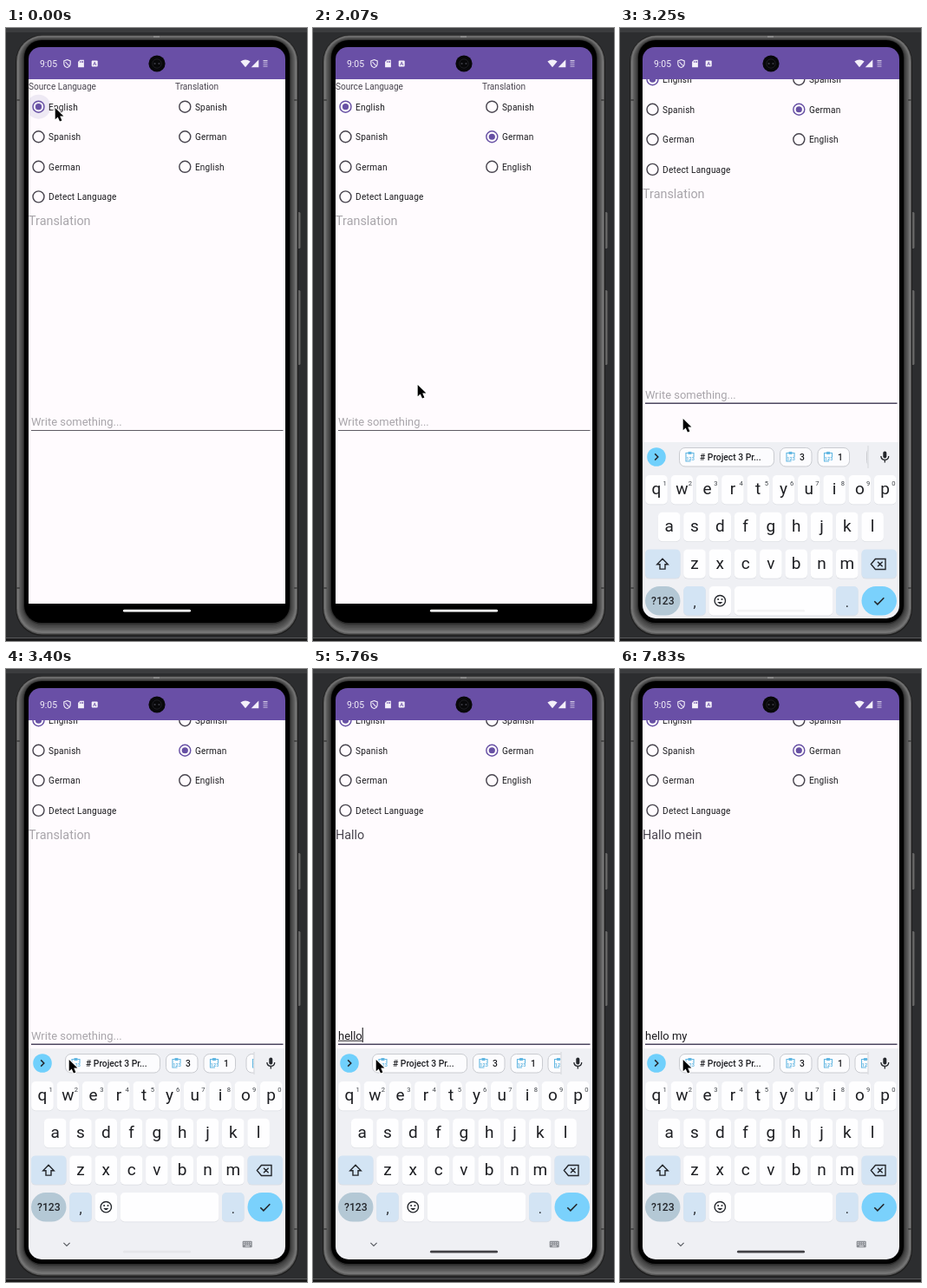
An HTML page with a canvas that plays this animation: 347 px wide and 706 px high, repeating every 8000 ms.

```html
<!DOCTYPE html>
<html lang="en">
<head>
<meta charset="utf-8">
<title>Translator app</title>
<style>
html, body { margin: 0; width: 100%; height: 100%; overflow: hidden; background: #2c2d2f; }
canvas { display: block; }
</style>
</head>
<body>
<canvas id="stage" width="347" height="706"></canvas>
<script>
const ctx = document.getElementById('stage').getContext('2d');
const LOOP = 8000, TICK = 147.7, LEAD = 8;
const PURPLE = '#6750a4', INK = '#1c1b1f', GREY = '#49454f', HINT = '#a8a5aa';
const SCROLL = 31.5;

// Pointer path: [tick, x, y]
const PATH = [
  [0, 56, 91], [1, 88, 107], [2, 145, 148], [3, 225, 186], [4, 296, 200],
  [5, 290, 172], [6, 236, 132], [7, 215, 123], [11, 215, 123], [12, 200, 170],
  [13, 160, 290], [14, 120, 410], [15, 95, 473], [16, 86, 470], [17, 81, 461], [18, 72, 449]
];
// Typed text by tick
const TYPED = [[0, ''], [35, 'h'], [36, 'hel'], [37, 'hello'], [40, 'hello '],
  [44, 'hello m'], [46, 'hello my'], [48, 'hello my ']];
const OUTPUT = [[0, ''], [39, 'Hallo'], [47, 'Hallo mein']];
const CARET = [[20, 22], [26, 28], [33, 53]];
const PILL = [[0, .06], [28, .25], [29, .5], [31, .92], [33, 1]];

const last = (list, k) => list.filter(e => e[0] <= k).pop()[1];
const within = (k, a, b) => k >= a && k < b;

function box(x, y, w, h, r, fill, stroke, width = 1) {
  ctx.beginPath();
  ctx.roundRect(x, y, w, h, r);
  if (fill) { ctx.fillStyle = fill; ctx.fill(); }
  if (stroke) { ctx.strokeStyle = stroke; ctx.lineWidth = width; ctx.stroke(); }
}

function disc(x, y, r, fill, stroke, width) {
  ctx.beginPath();
  ctx.arc(x, y, r, 0, 7);
  if (fill) { ctx.fillStyle = fill; ctx.fill(); }
  if (stroke) { ctx.strokeStyle = stroke; ctx.lineWidth = width; ctx.stroke(); }
}

function shape(d, x, y, fill, stroke, width = 1.2) {
  const p = new Path2D(d);
  ctx.save();
  ctx.translate(x, y);
  if (fill) { ctx.fillStyle = fill; ctx.fill(p); }
  if (stroke) { ctx.strokeStyle = stroke; ctx.lineWidth = width; ctx.stroke(p); }
  ctx.restore();
}

function text(s, x, y, size, color, { weight = 400, align = 'left', gap = 0 } = {}) {
  ctx.font = `${weight} ${size}px Roboto, sans-serif`;
  ctx.letterSpacing = gap + 'px';
  ctx.textAlign = align;
  ctx.fillStyle = color;
  ctx.fillText(s, x, y);
}

function clipped(x, y, w, h, r, draw) {
  ctx.save();
  ctx.beginPath();
  ctx.roundRect(x, y, w, h, r);
  ctx.clip();
  draw();
  ctx.restore();
}

function drawPhone() {
  ctx.fillStyle = '#2c2d2f';
  ctx.fillRect(0, 0, 347, 706);
  ctx.fillStyle = '#3b3c3e';
  ctx.fillRect(0, 0, 347, 5);
  ctx.fillStyle = '#1b1b1c';
  ctx.fillRect(0, 703, 347, 3);
  ctx.fillStyle = '#58595b';
  ctx.fillRect(0, 702, 347, 1);
  for (const [y, h] of [[212, 42], [302, 86]]) box(335, y, 4.5, h, 1.5, '#646464');
  // Metal rim: narrow at the top, wide at the bottom
  const rim = ['#1e1e1e', '#565656', '#767676', '#707070', '#626262', '#585858',
    '#505050', '#484848', '#3e3e3e', '#2a2a2a', '#000'];
  rim.forEach((c, i) => {
    const f = i / (rim.length - 1), side = 10 * f, top = 6 * f, bottom = 15 * f;
    box(11 + side, 8 + top, 326 - 2 * side, 692 - top - bottom, 31 - 11 * f, c);
  });
  ctx.fillStyle = '#8a8a8a';
  ctx.fillRect(170, 9, 7, 2);
  ctx.fillStyle = '#474747';
  for (const y of [82, 644]) {
    ctx.fillRect(12, y, 4, 2);
    ctx.fillRect(332, y, 4, 2);
  }
}

function drawStatus() {
  ctx.fillStyle = '#694fa6';
  ctx.fillRect(26, 22, 296, 37);
  const c = '#f3eff9';
  text('9:05', 39, 45, 10.4, c);
  shape('M0-4.4L3.7-3V0C3.7 2.4 2 3.9 0 4.6C-2 3.9-3.7 2.4-3.7 0V-3Z M-2-2L2 2.4', 70.5, 41, null, c, 1.1);
  shape('M-1.2-4.3H3.4V4.3H-3.4V-2Z', 86.5, 41, c);
  ctx.fillStyle = '#694fa6';
  for (let i = 0; i < 3; i++) ctx.fillRect(85.3 + i * 1.5, 38, .8, 2);
  box(98.7, 37.5, 7, 7, 1, c);
  text('A', 102.2, 43.2, 6, '#694fa6', { weight: 700, align: 'center' });
  shape('M0 4.3L-5.6-2.4Q0-6.4 5.6-2.4Z', 276, 41, c);
  shape('M4.3-4.4V4.3H-4.3Z', 287, 41, c);
  for (let i = 0; i < 4; i++) {
    ctx.fillStyle = i ? 'rgba(243,239,249,.5)' : 'rgba(243,239,249,.75)';
    ctx.fillRect(296.5, 37 + i * 2.2, 5, 1.3);
  }
  disc(174, 41, 9.6, '#08080a');
  disc(174, 41, 5.2, null, '#1d1d22', 1);
  disc(171.6, 41, 1.1, '#3a3a42');
  disc(176.4, 41, 1.1, '#3a3a42');
}

function drawRadio(x, y, label, on, ripple) {
  if (ripple) disc(x, y, 14, `rgba(103,80,164,${ripple})`);
  disc(x, y, 6.5, null, on ? PURPLE : GREY, 1.45);
  if (on) disc(x, y, 3.6, PURPLE);
  text(label, x + 11.6, y + 4, 10.08, INK, { gap: .18 });
}

function drawApp(k) {
  const focus = k >= 19, typed = last(TYPED, k), output = last(OUTPUT, k);
  ctx.fillStyle = '#fffbfe';
  ctx.fillRect(26, 59, 296, 604);
  ctx.save();
  if (k >= 22) ctx.translate(0, -SCROLL);
  text('Source Language', 26, 70.5, 10.08, GREY);
  text('Translation', 195, 70.5, 10.08, GREY);
  const row = i => 90.7 + i * 34.55;
  ['English', 'Spanish', 'German', 'Detect Language'].forEach((s, i) =>
    drawRadio(37.5, row(i), s, i === 0, i === 0 && k < 1 ? .11 : 0));
  ['Spanish', 'German', 'English'].forEach((s, i) =>
    drawRadio(206.3, row(i), s, i === 1 && k >= 10, i === 1 && within(k, 10, 13) ? .11 : 0));
  text(output || 'Translation', 26, 227, 14.4, output ? GREY : HINT);

  text(typed || 'Write something...', 29, 458, 12.96, typed ? INK : HINT);
  const end = typed ? 29 + ctx.measureText(typed).width : 29;
  ctx.fillStyle = focus ? '#4d4660' : '#5f5b64';
  ctx.fillRect(29, 463, 290.5, focus ? 1.5 : 1);
  ctx.fillStyle = INK;
  const word = k < 40 ? typed : k >= 44 && k < 50 ? typed.trim().slice(6) : '';
  if (word) {
    const w = ctx.measureText(word).width;
    const x = k < 40 ? 29 : 29 + ctx.measureText('hello ').width;
    ctx.fillRect(x, 459.2, w, 1);
  }
  if (CARET.some(([a, b]) => within(k, a, b))) ctx.fillRect(end, 444.5, 1.1, 17);
  ctx.restore();
}

function clipIcon(x, y) {
  const c = '#62b7e2';
  shape('M-2-4.5H-4.5V5H1 M2-4.5H4.5V0', x, y, null, c, 1.1);
  box(x - 2.2, y - 6, 4.4, 3, .8, c);
  text('123', x + .6, y + 3.6, 5.5, c, { weight: 700, align: 'center' });
}

function chip(x, w, label, textX) {
  box(x + .5, 443.5, w - 1, 21.5, 6.5, '#fcfcfe', '#c9cbd0');
  clipIcon(x + 12.5, 454);
  if (label) text(label, textX, 457.8, 10.3, '#1d1e22', { weight: 500 });
}

function key(x, y, w, label, fill = '#fefeff', r = 5) {
  if (r < 9) box(x, y + .8, w, 33.4, r, '#dcdee3');
  box(x, y, w, 33.4, r, fill);
  if (label) text(label, x + w / 2, y + 22.3, 19, '#1d1e22', { align: 'center' });
}

function drawKeyboard(k) {
  const dark = '#24272c', blue = '#d3e4f4', pitch = 29.3;
  ctx.fillStyle = '#eff0f4';
  ctx.fillRect(26, 437, 296, 290);

  disc(42, 454, 10.8, '#70d0fc');
  shape('M-1.8-3.6L1.8 0L-1.8 3.6', 42, 454, null, dark, 1.5);
  clipped(60, 438, 225.5, 34, 0, () => {
    chip(68, 110, '# Project 3 Pr...', 92);
    chip(184, 37.5, '3', 207);
    chip(227.5, 37.5, '1', 251);
    chip(k < 23 ? 284 : k < 24 ? 276.5 : 270.5, 37.5);
  });
  ctx.fillStyle = '#d3d5d9';
  ctx.fillRect(285.5, 441, 1, 26);
  box(303.3, 447.5, 4, 8, 2, dark);
  shape('M-4.4-.5C-4.4 5.3 4.4 5.3 4.4-.5 M0 4V7', 305.3, 453.5, null, dark, 1.3);

  [...'qwertyuiop'].forEach((s, i) => {
    const x = 29.2 + i * pitch;
    key(x, 475, 25.6, s);
    text((i + 1) % 10, x + 22.5, 486.5, 7.6, '#3c4046', { align: 'center' });
  });
  [...'asdfghjkl'].forEach((s, i) => key(43.9 + i * pitch, 517.8, 25.6, s));
  [...'zxcvbnm'].forEach((s, i) => key(73.2 + i * pitch, 560.4, 25.6, s));

  key(29, 560.4, 40.5, '', blue);
  shape('M0-6.3L6.3 .3H3V5.6H-3V.3H-6.3Z', 49, 577.5, null, dark, 1.4);
  key(278.5, 560.4, 40.5, '', blue);
  shape('M-8.6 0L-3.6-6H8V6H-3.6Z M-1-2.8L4.6 2.8 M4.6-2.8L-1 2.8', 298, 577.5, null, dark, 1.4);

  key(29, 603, 40.5, '', '#b4c8d5', 16.7);
  text('?123', 49.3, 624, 12.2, dark, { weight: 500, align: 'center' });
  key(73.2, 603, 25.6, '', blue);
  text(',', 86, 627, 16, dark, { align: 'center' });
  key(102.5, 603, 25.6);
  disc(115.3, 619.7, 6.2, null, dark, 1.4);
  disc(113.1, 618, 1, dark);
  disc(117.5, 618, 1, dark);
  shape('M-3 1.4Q0 5.6 3 1.4Z', 115.3, 619.7, dark);
  key(131.8, 603, 113.5);
  key(249, 603, 25.6, '', blue);
  text('.', 261.8, 627, 16, dark, { align: 'center' });
  key(278.5, 603, 40.5, '', '#7ad1fc', 16.7);
  shape('M-5.4 .2L-1.8 3.8L5.6-3.8', 298.7, 620, null, dark, 1.6);

  shape('M-3.6-1.7L0 1.9L3.6-1.7', 70, 662.5, null, '#5c5f65', 1.2);
  box(272.7, 658.7, 11, 7.5, 1, '#8b8e94');
  ctx.fillStyle = '#eff0f4';
  for (let i = 0; i < 8; i++) ctx.fillRect(274 + i % 4 * 2.4, 660.2 + (i >> 2) * 2, 1.1, 1);
  ctx.fillRect(275.8, 664.3, 5, .9);
}

function drawPointer(k) {
  const [, x, y] = PATH.filter(p => p[0] <= k).pop();
  const d = 'M0 0V13.4L3 10.6L5.3 15.6L7.7 14.6L5.5 9.7H9.7Z';
  ctx.lineJoin = 'round';
  shape(d, x + .7, y + .9, null, '#fff', 2);
  shape(d, x + .7, y + .9, '#000');
  ctx.lineJoin = 'miter';
}

function drawScreen(k) {
  const open = k >= 22;
  clipped(26, 22, 296, 658, [14, 14, 15, 15], () => {
    ctx.fillStyle = '#000';
    ctx.fillRect(26, 22, 296, 658);
    drawApp(k);
    if (open) {
      ctx.save();
      if (k < 23) ctx.translate(0, 40);
      drawKeyboard(k);
      ctx.restore();
    }
    drawStatus();
    box(135, 669.8, 78, 2.8, 1.4, open ? `rgba(66,66,70,${last(PILL, k)})` : '#fff');
  });
}

function frame(now) {
  const k = Math.floor((now % LOOP + LEAD) / TICK);
  drawPhone();
  drawScreen(k);
  drawPointer(k);
  requestAnimationFrame(t => frame(Math.max(0, t - start)));
}

const start = performance.now();
frame(0);
</script>
</body>
</html>
```
